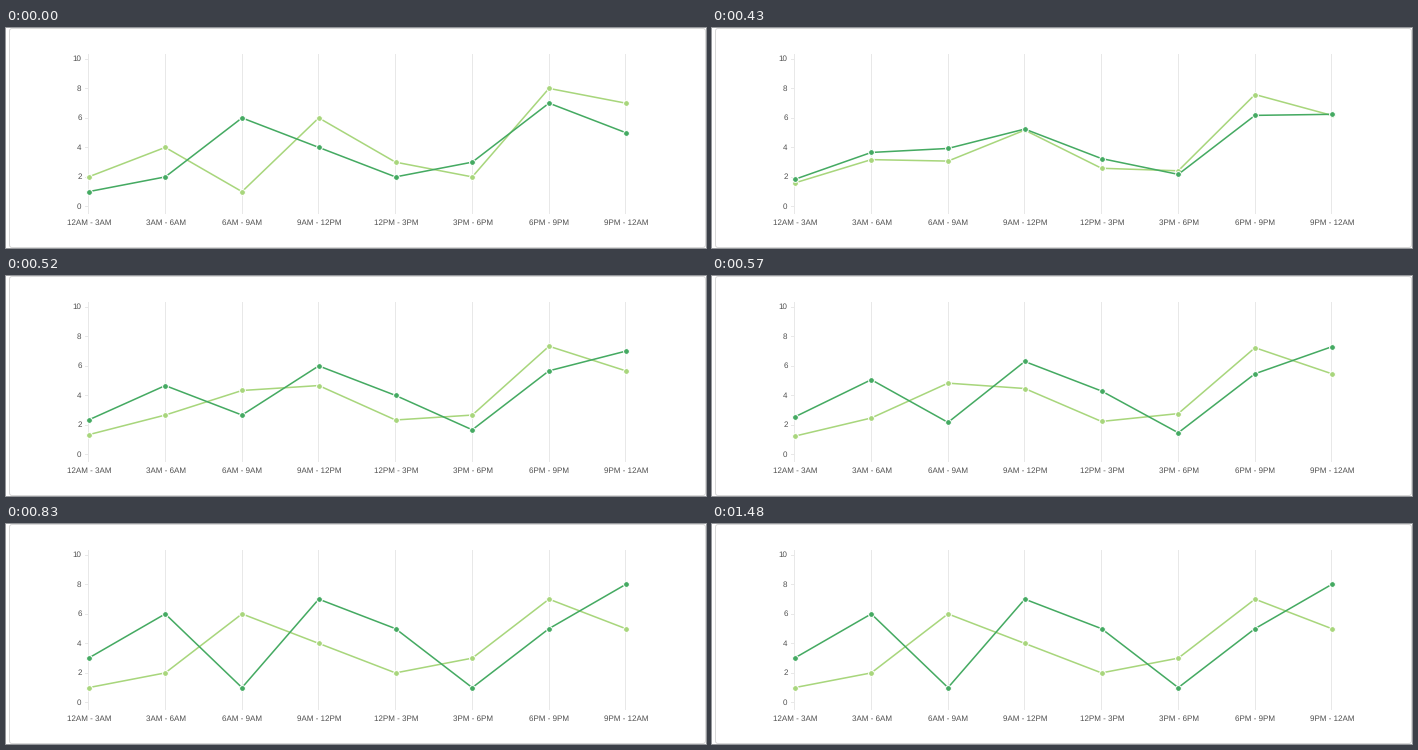
These frames come from a looping animation (700 by 220 pixels, 1530 ms). A matplotlib script:

```python
import numpy as np
import matplotlib.pyplot as plt
from matplotlib.animation import FuncAnimation
from matplotlib.patches import FancyBboxPatch

W, H, DPI = 700, 220, 100
LOOP, TICK = 1530, 10      # ms
STEP = 43.45               # ms between redraws of the chart
PX = 72 / DPI              # one pixel in points

plt.rcParams["font.family"] = "Liberation Sans"
plt.rcParams["text.hinting"] = "none"
plt.rcParams["text.hinting_factor"] = 1

DARK, LIGHT = "#45aa62", "#a8d67c"
INK, GRID, FRAME = "#505050", "#e8e8e8", "#d9d9d9"
LABEL = 7.6 * PX

SLOTS = ["12AM - 3AM", "3AM - 6AM", "6AM - 9AM", "9AM - 12PM",
         "12PM - 3PM", "3PM - 6PM", "6PM - 9PM", "9PM - 12AM"]
BASE = np.array([1, 2, 6, 4, 2, 3, 7, 5])
SERIES = [  # colour, start values, end values
    (LIGHT, np.array([2, 4, 1, 6, 3, 2, 8, 7]), BASE),
    (DARK, BASE, np.array([3, 6, 1, 7, 5, 1, 5, 8])),
]

xs = 82.5 + 76.75 * np.arange(len(SLOTS))


def to_y(value):
    return 178.4 - 14.75 * value


def progress(ms):
    """Ease-out quad; the first redraw lands part-way through."""
    step = int((ms + TICK / 2) / STEP)
    if step < 10:
        return 0.0
    u = min((step - 7.5) / 10.65, 1)
    return 1 - (1 - u) ** 2


fig = plt.figure(figsize=(W / DPI, H / DPI), dpi=DPI, facecolor="white")
ax = fig.add_axes([0, 0, 1, 1])
ax.set_xlim(0, W)
ax.set_ylim(H, 0)
ax.axis("off")

ax.add_patch(FancyBboxPatch(
    (3.5, 0.5), W - 4, H - 1, boxstyle="round,pad=0,rounding_size=2.5",
    fc="white", ec=FRAME, lw=PX))

for x, slot in zip(xs, SLOTS):
    col = np.floor(x)
    ax.plot([col, col], [26, 185], color=GRID, lw=PX, zorder=1)
    ax.text(x + 0.3, 197.4, slot, size=LABEL, color=INK,
            ha="center", va="baseline")
for v in range(0, 11, 2):
    ax.plot([79, 82], [to_y(v)] * 2, color=GRID, lw=PX, zorder=1)
    ax.text(75.6, to_y(v) + 2.3, str(v), size=LABEL, color=INK,
            ha="right", va="baseline")

lines = [
    ax.plot(xs, to_y(a), color=color, lw=1.55 * PX, marker="o", ms=5.8 * PX,
            mec="white", mew=PX, solid_joinstyle="round", zorder=3 + i)[0]
    for i, (color, a, b) in enumerate(SERIES)
]
for line in lines:
    line.set_snap(False)


def update(i):
    p = progress(i * TICK)
    for line, (_, a, b) in zip(lines, SERIES):
        line.set_ydata(to_y(a + (b - a) * p))
    return lines


anim = FuncAnimation(fig, update, frames=LOOP // TICK, interval=TICK,
                     repeat=True, repeat_delay=0)
plt.show()
```
